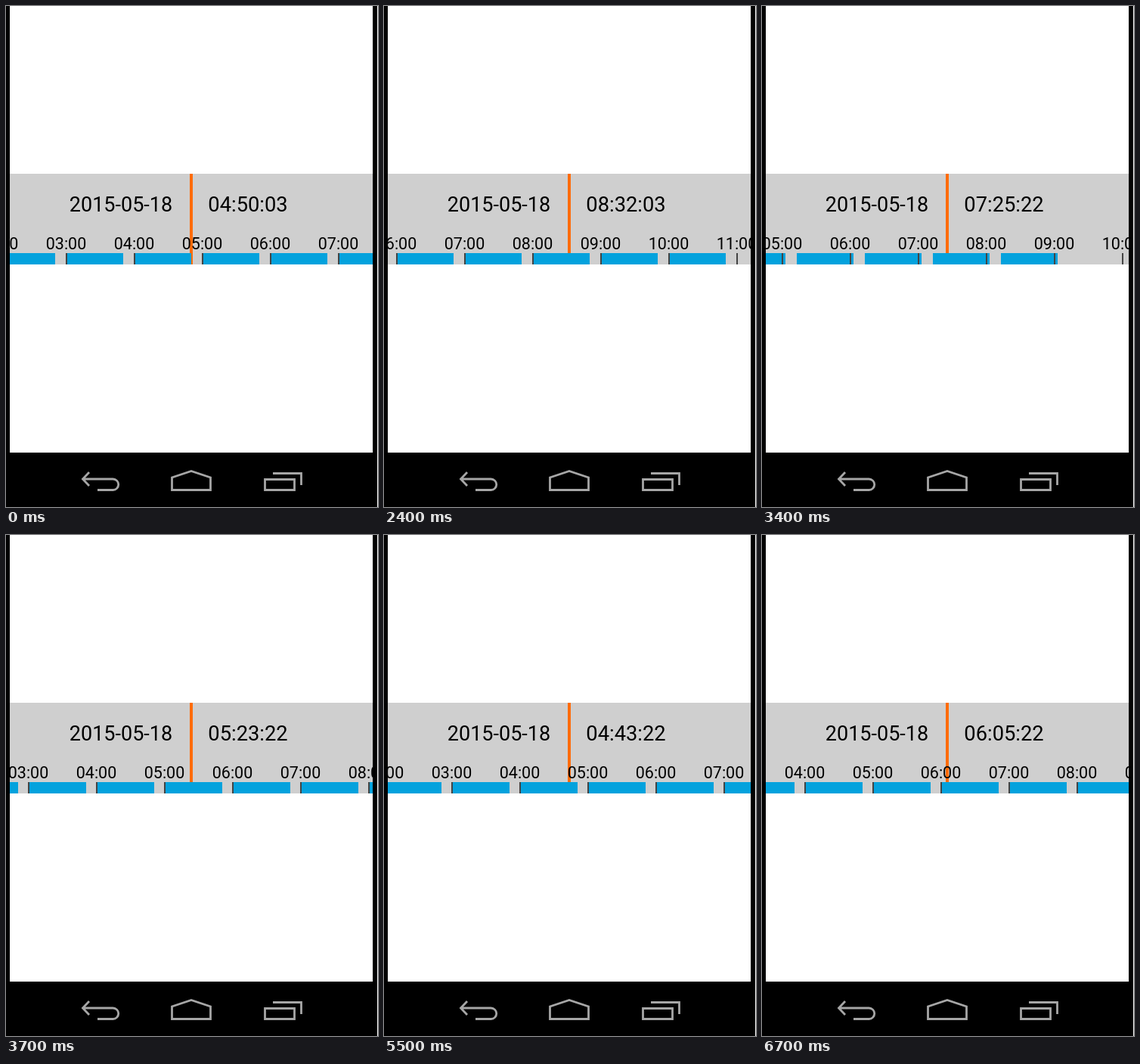
Recreate the animation shown at these times as an HTML page with a canvas. Size 492 by 663 pixels, loop 7200 ms.

```html
<!DOCTYPE html>
<html lang="en">
<head>
<meta charset="utf-8">
<title>Scrolling time bar</title>
<style>
  html, body { margin: 0; width: 100%; height: 100%; overflow: hidden; background: #000; }
  canvas { display: block; }
</style>
</head>
<body>
<canvas id="stage" width="492" height="663"></canvas>
<script>
const ctx = document.getElementById('stage').getContext('2d');

const LOOP = 7200, STEP = 100;
const LEFT = 5, RIGHT = 485, TOP = 222, BOTTOM = 342, BAR_TOP = 327;
const CENTER = 245, HOUR_WIDTH = 90;
const SECONDS_PER_PIXEL = 3600 / HOUR_WIDTH;
const RECORDED_HOURS = 10, RECORDING = 50 * 60;

const hms = (h, m, s) => h * 3600 + m * 60 + s;
const pad = n => String(n).padStart(2, '0');
const smooth = p => p * p * (3 - 2 * p);
const easeOut = power => p => 1 - (1 - p) ** power;

const START = hms(4, 50, 3);
const drags = [
  { at: 2000, end: 2500, from: hms(4, 54, 3), to: hms(8, 57, 22), ease: smooth },
  { at: 3200, end: 3700, from: hms(8, 32, 2), to: hms(5, 23, 22), ease: smooth },
  { at: 5300, end: 5500, from: hms(5, 4, 2), to: hms(4, 43, 22), ease: easeOut(2) },
  { at: 6000, end: 6200, from: hms(5, 33, 22), to: hms(6, 48, 2), ease: easeOut(4) },
  { at: 6200, end: 6700, from: hms(6, 48, 2), to: hms(6, 5, 22), ease: smooth }
];

const dragAt = time => drags.filter(d => d.at <= time).pop();

function isSettled(time) {
  const drag = dragAt(time);
  return !drag || time >= drag.end;
}

function clockAt(time) {
  const drag = dragAt(time);
  if (!drag) return START;
  if (time >= drag.end) return drag.to;
  const moved = (drag.to - drag.from) * drag.ease((time - drag.at) / (drag.end - drag.at));
  return drag.from + Math.round(moved / SECONDS_PER_PIXEL) * SECONDS_PER_PIXEL;
}

// Recordings trail the ruler by one step, and by one pixel after a drag.
function recordingClockAt(time) {
  const shown = isSettled(time) ? time : time - STEP;
  const slip = dragAt(shown) && isSettled(shown) ? SECONDS_PER_PIXEL : 0;
  return clockAt(shown) - slip;
}

function fillRect(color, x, y, width, height) {
  ctx.fillStyle = color;
  ctx.fillRect(x, y, width, height);
}

function drawText(text, x, y, size) {
  ctx.font = `${size}px Roboto, sans-serif`;
  ctx.textAlign = 'center';
  ctx.fillStyle = '#000';
  ctx.fillText(text, x, y);
}

const navigation = [
  new Path2D('M110 617L101.500 626L110 635M102 626H141.500A7.200 7.200 0 0 1 141.500 640.500H121'),
  new Path2D('M219.500 640.500V624L245 615.500L270.500 624V640.500Z'),
  new Path2D('M342.500 626.500H381.500V640.500H342.500ZM353 618.500H390.500V634')
];

function drawDevice() {
  fillRect('#000', 0, 0, 492, 663);
  fillRect('#fff', 491, 0, 1, 663);
  fillRect('#fff', LEFT, 0, RIGHT - LEFT, 591);
  ctx.strokeStyle = '#a6a6a6';
  ctx.lineWidth = 2.8;
  navigation.forEach(icon => ctx.stroke(icon));
}

function drawTimeBar(time) {
  const clock = clockAt(time);
  const recordingClock = recordingClockAt(time);
  const xOf = (seconds, now) => CENTER + (seconds - now) / SECONDS_PER_PIXEL;

  ctx.save();
  ctx.beginPath();
  ctx.rect(LEFT, TOP, RIGHT - LEFT, BOTTOM - TOP);
  ctx.clip();
  fillRect('#cfcfcf', LEFT, TOP, RIGHT - LEFT, BOTTOM - TOP);
  fillRect('#ff6c0a', CENTER - 2, TOP, 4, BOTTOM - TOP);

  for (let hour = 0; hour < RECORDED_HOURS; hour++) {
    const x = Math.round(xOf(hour * 3600, recordingClock));
    fillRect('#03a2dd', x, BAR_TOP, RECORDING / SECONDS_PER_PIXEL, BOTTOM - BAR_TOP);
  }
  for (let hour = 0; hour < 24; hour++) {
    const x = Math.round(xOf(hour * 3600, clock));
    fillRect('#444', x - 1, BAR_TOP, 2, BOTTOM - BAR_TOP);
    drawText(`${pad(hour)}:00`, x - 0.5, 322, 21.5);
  }

  const parts = [clock / 3600, clock / 60 % 60, clock % 60];
  drawText('2015-05-18', 152, 272, 27);
  drawText(parts.map(n => pad(Math.floor(n))).join(':'), 320, 272, 27.3);
  ctx.restore();
}

function frame() {
  const time = performance.now() % LOOP;
  drawDevice();
  drawTimeBar(Math.floor(time / STEP) * STEP);
  requestAnimationFrame(frame);
}
frame();
</script>
</body>
</html>
```
